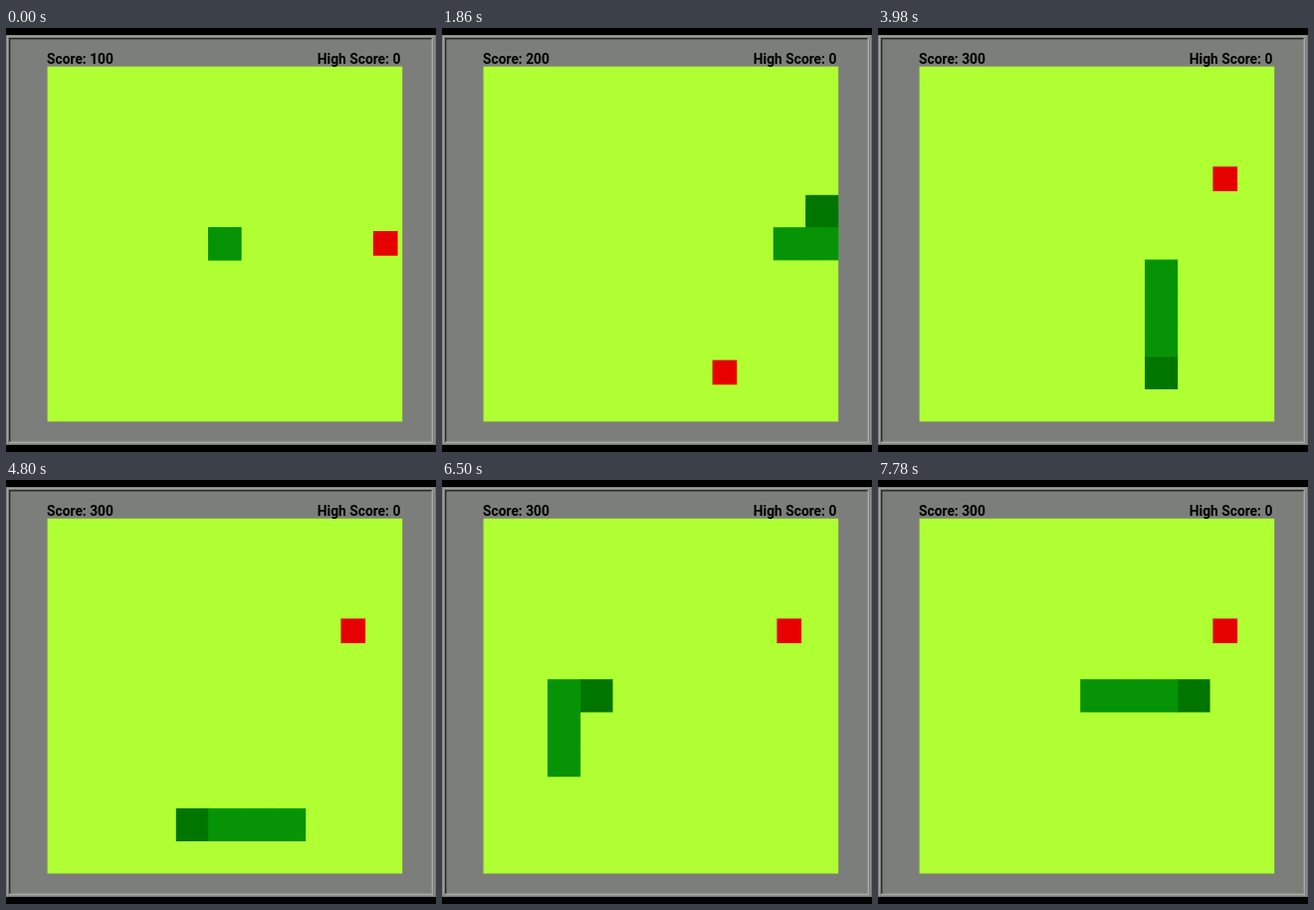
Animation, 432 px wide and 426 px high, one loop 8000 ms. Source, as an HTML page with a canvas:

```html
<!DOCTYPE html>
<html lang="en">
<head>
<meta charset="utf-8">
<title>Snake</title>
<style>
  html, body { margin: 0; width: 100%; height: 100%; overflow: hidden; background: #000; }
  canvas { display: block; }
</style>
</head>
<body>
<canvas id="stage" width="432" height="426"></canvas>
<script>
const ctx = document.getElementById('stage').getContext('2d');

const LOOP = 8000;
const CELL = 32.4;
const BLOCK = 33.2; // a cell plus its outline
const APPLE = 24.7;
const START = [5, 5];
const PATH = 'RRRRRULLLDDDDDLLLLLUUUURRRRRR';
const STEP_TIMES = [
  500, 760, 1020, 1340, 1620, 1860, 2140, 2420, 2700, 2980,
  3220, 3420, 3720, 3980, 4240, 4420, 4800, 4980, 5220, 5450,
  5680, 6060, 6260, 6500, 6800, 7060, 7360, 7500, 7780
];
const APPLES = [[10, 5], [7, 9], [9, 3]];
const DIRS = { R: [1, 0], L: [-1, 0], U: [0, -1], D: [0, 1] };

const colX = c => 41.2 + CELL * c;
const rowY = r => 38.2 + CELL * r;

function rect(color, x, y, w, h) {
  ctx.fillStyle = color;
  ctx.fillRect(x, y, w, h);
}

function fillCell(color, [c, r]) {
  rect(color, colX(c), rowY(r), BLOCK, BLOCK);
}

function drawApple([c, r]) {
  const inset = (CELL - APPLE) / 2;
  rect('#e60000', colX(c) + inset - 0.2, rowY(r) + inset, APPLE, APPLE);
}

// Bevel: one colour for the top and left edges, one for the bottom and right.
function bevel(x, y, w, h, t, topLeft, bottomRight) {
  rect(topLeft, x, y, w, t);
  rect(topLeft, x, y, t, h);
  rect(bottomRight, x, y + h - t, w, t);
  rect(bottomRight, x + w - t, y, t, h);
}

// Replays the moves made so far; the head comes first in the body list.
function stateAt(time) {
  let body = [START, START], eaten = 0;
  for (let i = 0; i < PATH.length && STEP_TIMES[i] <= time; i++) {
    const [dx, dy] = DIRS[PATH[i]];
    const head = [body[0][0] + dx, body[0][1] + dy];
    const apple = APPLES[eaten];
    body = [head, ...body];
    if (head[0] === apple[0] && head[1] === apple[1]) eaten++;
    else body.pop();
  }
  return { body, eaten };
}

function drawPanel() {
  rect('#000', 0, 0, 432, 426);
  rect('#7c7e7b', 0, 7, 432, 412);
  bevel(0, 7, 432, 412, 1, '#848683', '#747673');
  bevel(1, 8, 430, 410, 1, '#a2a4a1', '#8c8e8b');
  bevel(3, 10, 426, 407, 1.4, '#2a2c2a', '#a8aaa7');
  rect('#b0ff32', 41.6, 38.7, 356.6, 356.7);
}

function drawText(text, x, align) {
  ctx.font = 'bold 13.8px Roboto, Arial, sans-serif';
  ctx.textAlign = align;
  ctx.fillStyle = '#000';
  ctx.fillText(text, x, 36);
}

function draw(time) {
  const { body, eaten } = stateAt(time);
  drawPanel();
  drawApple(APPLES[eaten]);
  fillCell('#007500', body[0]);
  body.slice(1).forEach(cell => fillCell('#069406', cell));
  drawText('Score: ' + 100 * (eaten + 1), 41, 'left');
  drawText('High Score: 0', 396.3, 'right');
}

const begin = performance.now();
function tick() {
  draw((performance.now() - begin) % LOOP);
  requestAnimationFrame(tick);
}
tick();
</script>
</body>
</html>
```
